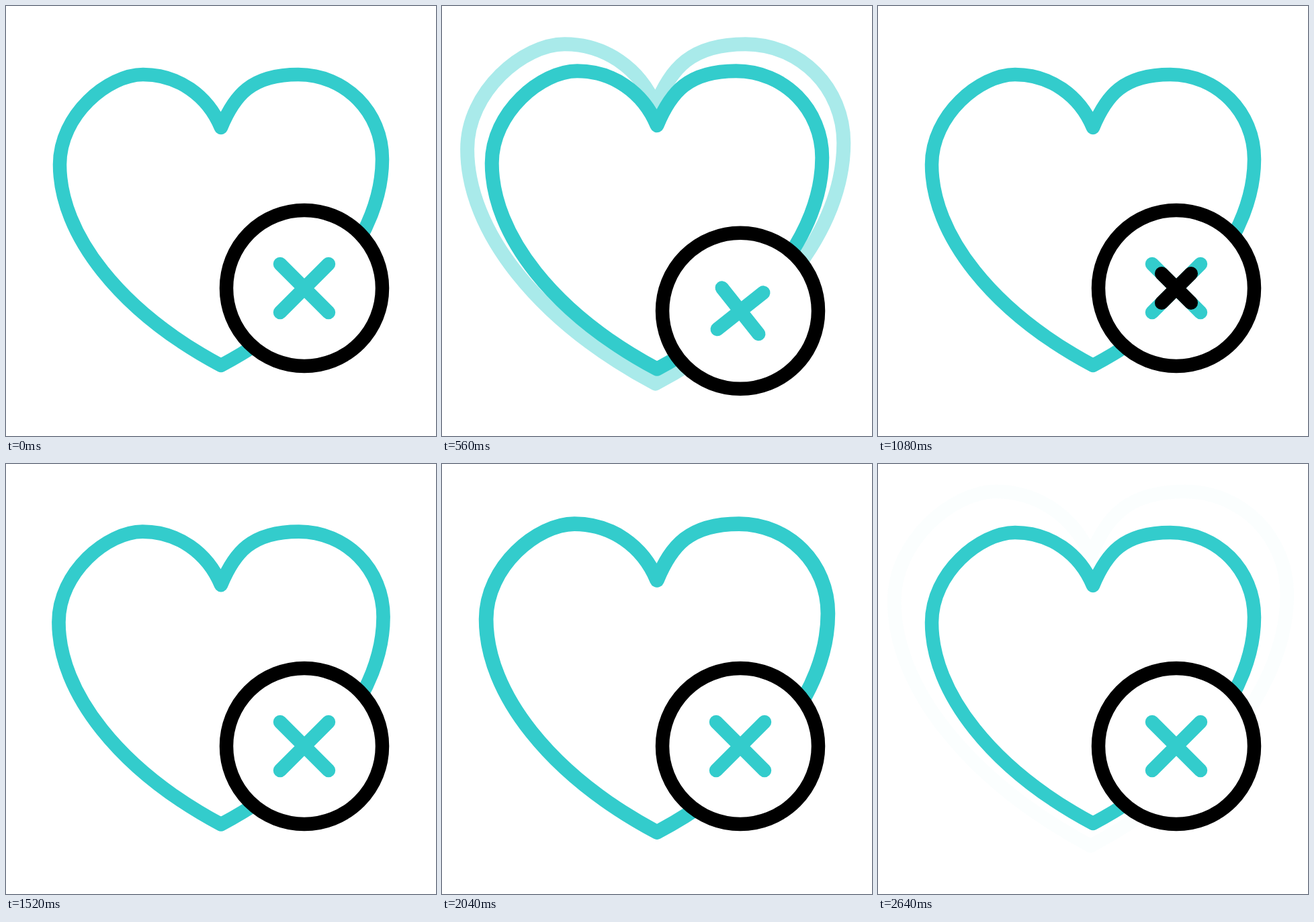
These frames come from a looping animation (640 by 640 pixels, 3000 ms). An HTML page:

```html
<!DOCTYPE html>
<html lang="en">
<head>
<meta charset="utf-8">
<title>Heart with remove badge</title>
<style>
  html, body { margin: 0; width: 100%; height: 100%; overflow: hidden; background: #fff; }
  svg { display: block; width: 100%; height: 100%; }
  .line { fill: none; stroke: #33cccc; stroke-width: 20.5; stroke-linecap: round; stroke-linejoin: round; }
  .dark { stroke: #000; }
  .disc { fill: #fff; }
</style>
</head>
<body>
<svg viewBox="0 0 640 640">
  <defs>
    <path id="shape" d="M320 181C300 133 256 102 204 102S80 162 80 236C80 340 170 455 320 535C470 455 560 337 560 228C560 158 505 102 435 102S340 133 320 181Z"/>
  </defs>
  <g id="heart">
    <use id="echo" class="line" href="#shape"/>
    <use class="line" href="#shape"/>
  </g>
  <g id="badge">
    <circle class="line dark disc" r="116"/>
    <path id="cross" class="line"/>
    <path id="ink" class="line dark"/>
  </g>
</svg>
<script>
const LOOP = 3000, STEP = 40, STROKE = 20.5, ARM = 36;
const $ = id => document.getElementById(id);
const heart = $('heart'), echo = $('echo'), badge = $('badge'), cross = $('cross'), ink = $('ink');

// Progress from a to b, clamped to 0..1
const span = (t, a, b) => Math.min(1, Math.max(0, (t - a) / (b - a)));
const ease = (t, a, b) => { const u = span(t, a, b); return u * u * (3 - 2 * u); };
const hump = (t, a, b) => Math.sin(Math.PI * span(t, a, b));

// Eases from 0 down to -low, up to high and back to 0
const swing = (t, start, dip, peak, end, low, high) =>
  -low * ease(t, start, dip) + (low + high) * ease(t, dip, peak) - high * ease(t, peak, end);

// An outline that leaves the heart, growing and fading over its life
function pulse(t, start, life, size, power, rest) {
  const u = span(t, start, start + life);
  return {
    scale: 1 + size * (1 - (1 - u) ** power),
    alpha: t < start ? 0 : Math.max(rest, 0.766 * (1 - u))
  };
}

const scaleAt = (x, y, s) => `translate(${x} ${y}) scale(${s}) translate(${-x} ${-y})`;
const crossPath = r => `M${-r} ${-r}L${r} ${r}M${r} ${-r}L${-r} ${r}`;

function draw(t) {
  const beat = 1 + swing(t, 80, 340, 680, 880, 0.038, 0.049) + 0.06 * hump(t, 1480, 2640);
  heart.setAttribute('transform', scaleAt(320, 318.3, beat));

  const { scale, alpha } = t < 1400
    ? pulse(t, 213, 766, 0.308, 1, 0)
    : pulse(t, 2060, 543, 0.218, 1.6, 0.02);
  echo.setAttribute('transform', scaleAt(336, 382, scale));
  echo.style.strokeWidth = STROKE / scale;
  echo.style.opacity = alpha;

  const hop = swing(t, 80, 326, 640, 825, 1, 1);
  badge.setAttribute('transform', `translate(444 ${420 + 50 * hop})`);
  cross.setAttribute('d', crossPath(ARM * (1 - 0.28 * hop + 0.106 * hop * hop)));
  cross.setAttribute('transform', `rotate(${7.1 * hump(t, 80, 840)})`);

  ink.setAttribute('d', crossPath(ARM * ease(t, 920, 1200)));
  ink.style.visibility = t > 920 && t < 1240 ? 'visible' : 'hidden';
}

const start = performance.now();
function tick() {
  const t = (performance.now() - start) % LOOP;
  draw(Math.floor(t / STEP) * STEP);
  requestAnimationFrame(tick);
}
tick();
</script>
</body>
</html>
```
